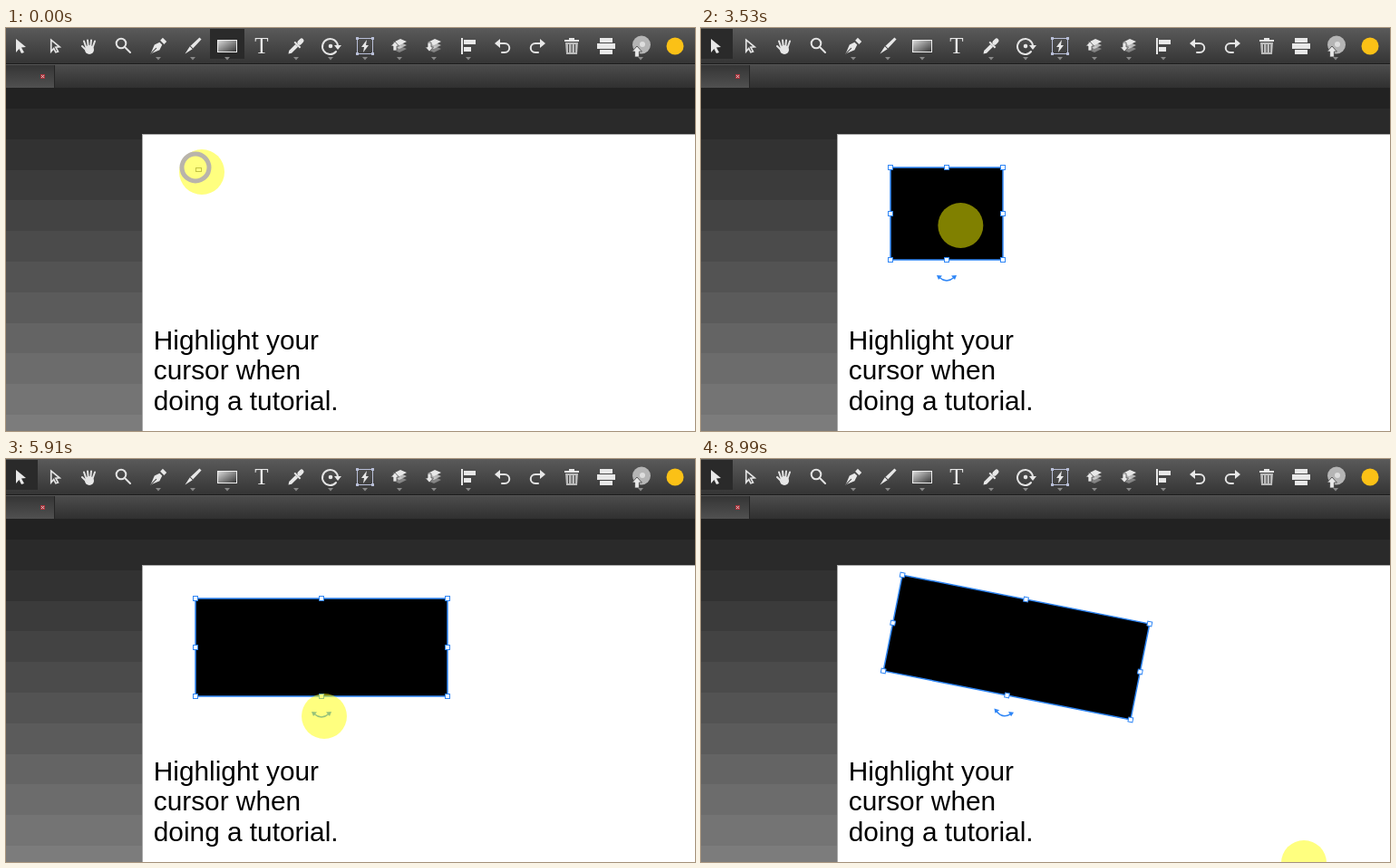
These frames come from a looping animation (760x445 px, 9290 ms). An HTML page:

```html
<!DOCTYPE html>
<html lang="en">
<head>
<meta charset="utf-8">
<title>Cursor highlight</title>
<style>
html, body { margin: 0; width: 100%; height: 100%; overflow: hidden; background: #fff; }
svg { display: block; width: 760px; height: 445px; }
.note { font: 29.8px "Liberation Sans", Arial, sans-serif; }
.glyph { font: 25px "Liberation Serif", Times, serif; text-anchor: middle; }
.line { fill: none; stroke: #e4e4e4; stroke-width: 2; stroke-linecap: round; }
.cut { fill: none; stroke: #444; stroke-width: 1; }
</style>
</head>
<body>
<svg viewBox="0 0 760 445" xmlns="http://www.w3.org/2000/svg">
  <defs>
    <linearGradient id="bar" x2="0" y2="1"><stop stop-color="#5a5a5a"/><stop offset="1" stop-color="#353535"/></linearGradient>
    <linearGradient id="strip" x2="0" y2="1"><stop stop-color="#4c4c4c"/><stop offset="1" stop-color="#303030"/></linearGradient>
    <linearGradient id="tab" x2="0" y2="1"><stop stop-color="#353535"/><stop offset="1" stop-color="#505050"/></linearGradient>
    <linearGradient id="shade" x2="1" y2="1"><stop stop-color="#ddd"/><stop offset="1" stop-color="#333"/></linearGradient>
  </defs>

  <g id="backdrop"></g>
  <rect x="150.5" y="117.5" width="620" height="340" fill="#fff" stroke="#aaa"/>
  <rect width="760" height="39" fill="url(#bar)"/>
  <rect y="39" width="760" height="1" fill="#1c1c1c"/>
  <rect y="40" width="760" height="1" fill="#555"/>
  <rect y="41" width="760" height="25" fill="url(#strip)"/>
  <rect y="41" width="53" height="25" fill="url(#tab)"/>
  <path d="M53.5 41V66" stroke="#252525"/>
  <rect x="38" y="51" width="5" height="5" fill="#a8323a"/>
  <path d="M39 52l3 3m0-3l-3 3" stroke="#ddd" stroke-width=".8"/>
  <rect id="tool" y="1" width="38" height="33" fill="#2a2a2a"/>
  <g id="icons" fill="#e8e8e8"></g>

  <g class="note">
    <text x="162.8" y="355">Highlight your</text>
    <text x="162.8" y="388">cursor when</text>
    <text x="162.8" y="422">doing a tutorial.</text>
  </g>
  <g id="drawing"></g>
  <g id="pointer"></g>
</svg>
<script>
const LOOP = 9290, STEPS = 63, STEP = LOOP / STEPS;
const BLUE = '#2f86f6', LEFT = 209, TOP = 154, PITCH = 38;
const PIVOT = { x: 348, y: 208 };
const el = id => document.getElementById(id);
const repeat = (count, draw) => Array.from({ length: count }, (_, i) => draw(i)).join('');

const path = (d, attrs = '') => `<path d="${d}" ${attrs}/>`;
const box = (x, y, w, h, attrs = '') =>
  `<rect x="${x}" y="${y}" width="${w}" height="${h}" ${attrs}/>`;
const disc = (x, y, r, attrs = '') => `<circle cx="${x}" cy="${y}" r="${r}" ${attrs}/>`;
const group = (transform, body) => `<g transform="${transform}">${body}</g>`;

// Toolbar icons, each drawn around its own centre
const LINE = 'class="line"', CUT = 'class="cut"';
const ARROW = 'M-5-8 6 1 1 1.500 4 7 1 8-1.500 3-5 7z';
const arrowUp = path('M0-5l4.500 5h-2.500v5h-4v-5h-2.500z', 'stroke="#444" stroke-width=".7"');
const layers = repeat(3, i =>
  path(`M-7 ${4 * i - 4}l8-4 7 3-8 4z`, `opacity="${1 - i * 0.3}"`));
const undo = path('M-5-3h7c7 0 7 10 0 10h-3', LINE) + path('M-9-3l6-5v10z');
const icons = [
  path(ARROW),
  group('scale(.85)', path(ARROW, LINE)),
  disc(0, 4, 5) + repeat(4, i =>
    path(`M${i * 2 - 3} 3L${i * 4 - 6} ${-7 + Math.abs(i - 1.5)}`, LINE)) + path('M-3 5l-5-5', LINE),
  disc(-3, -3, 5.3, LINE) + path('M1 1l6 6', LINE),
  group('rotate(45)', path('M0 12l-4-10 2-6h4l2 6z') + box(-3, -10, 6, 4) + path('M0 11V3', CUT)),
  group('rotate(45)', path('M0 12l-2-9 .5-15h3l.5 15z') + path('M-2 2h4', CUT)),
  box(-10.5, -6.5, 21, 13, 'fill="url(#shade)" stroke="#eee"'),
  '<text class="glyph" y="8">T</text>',
  group('rotate(45)', path('M0 12l-2-3v-10h4v10z') + box(-4.5, -3, 9, 2) + box(-2.5, -11, 5, 8, 'rx="2.500"')),
  path('M6 6a8.500 8.500 0 1 1 2-6', LINE) + path('M4-1h8l-4 5z') + disc(0, 0, 2.3),
  box(-8.5, -8.5, 17, 17, 'fill="none" stroke="#b9bfd8"') + repeat(4, i =>
    box(i % 2 ? 7 : -10, i < 2 ? -10 : 7, 3, 3, 'fill="#b9bfd8"')) + path('M2-7l-6 8h3l-1 6 6-8h-3z'),
  layers + group('translate(-5 0)', arrowUp),
  layers + group('translate(-5 1) scale(1 -1)', arrowUp),
  box(-8, -9, 2, 18) + box(-5, -7, 13, 5) + box(-5, 1, 8, 5),
  undo,
  group('scale(-1 1)', undo),
  box(-8, -7, 16, 2) + box(-3, -9, 6, 2) + path('M-7-4h14l-1 13h-12z', 'fill="#bbb"') +
    repeat(3, i => path(`M${i * 3.5 - 3.5}-2v9`, CUT)),
  box(-7, -9, 14, 5) + box(-10, -3, 20, 6) + box(-7, 4, 14, 5),
  disc(1, -1.5, 10, 'fill="#b5b5b5"') + disc(2, -2, 3, 'fill="#ddd"') +
    group('translate(-4 6) scale(1.2)', arrowUp),
  disc(0, 0, 9.5, 'fill="#fbc116"')
];
const hasMenu = i => i > 3 && i < 14 && i !== 7 || i === 18;

// Cursor rests: arrival step, leaving step, x, y
const rests = [
  [-2, -2, 209, 154], [0, 0, 216, 159], [5, 8, 333, 256], [10, 10, 350, 264],
  [16, 17, 41, -4], [19, 21, 17, 18], [25, 25, 355, 269], [28, 30, 333, 256],
  [32, 32, 400, 264], [35, 37, 487, 262], [40, 42, 351, 284], [48, 50, 311, 275],
  [53, 54, 337, 278], [58, 58, 591, 385], [61, 62, 665, 446]
];
const clickSteps = [-2, 5, 19, 28, 37, 42, 54];

const ease = k => (k + k * k * (3 - 2 * k)) / 2;

function cursorAt(n) {
  const i = rests.findIndex(([, leave]) => leave >= n);
  const [arrive, , x, y] = rests[i];
  if (n >= arrive) return { x, y };
  const [, left, fromX, fromY] = rests[i - 1];
  const k = ease((n - left) / (arrive - left));
  return { x: fromX + (x - fromX) * k, y: fromY + (y - fromY) * k };
}

function turnAt(n) {
  const angle = p => Math.atan2(PIVOT.x - p.x, p.y - PIVOT.y) * 180 / Math.PI;
  return angle(cursorAt(n)) - angle(cursorAt(42));
}

const fill = (r, b) => box(LEFT, TOP, r - LEFT, b - TOP);
const outline = (r, b, width = 1.5) =>
  box(LEFT, TOP, r - LEFT, b - TOP, `fill="none" stroke="${BLUE}" stroke-width="${width}"`);
const rotated = (deg, body) => group(`rotate(${deg} ${PIVOT.x} ${PIVOT.y})`, body);

function handles(r, b, open) {
  const size = open ? 5 : 4;
  const look = open ? `fill="#fff" stroke="${BLUE}"` : `fill="${BLUE}"`;
  return repeat(9, i => i === 4 ? '' : box(
    LEFT + (r - LEFT) * (i % 3) / 2 - size / 2,
    TOP + (b - TOP) * Math.floor(i / 3) / 2 - size / 2, size, size, look));
}

const turnIcon = (r, b) => group(`translate(${(LEFT + r) / 2} ${b + 20.5})`,
  path('M-8-1Q0 6 8-1', `fill="none" stroke="${BLUE}" stroke-width="1.5"`) +
  path('M-11-3.500l6 .5-4 4.500zM11-3.500l-6 .5 4 4.500z', `fill="${BLUE}"`));

const selected = (r, b, open) =>
  fill(r, b) + outline(r, b) + handles(r, b, open) + (open ? turnIcon(r, b) : '');

function drawing(n, c) {
  if (n < 1) return '';
  if (n < 5) return outline(c.x, c.y);
  if (n < 30) return selected(333, 256, n >= 20);
  if (n < 37) return fill(333, 256) + outline(c.x, c.y) + turnIcon(c.x, c.y);
  if (n < 43) return selected(487, 262, true);
  if (n < 54) return fill(487, 262) + rotated(turnAt(n), outline(487, 262, 1));
  return rotated(turnAt(53), selected(487, 262, true));
}

function ring(n, start) {
  const age = n - start;
  if (age < 0 || age > 2) return '';
  const { x, y } = cursorAt(start);
  const color = `color-mix(in srgb, #8a829e, #b9b4ab ${Math.max(0, age - 1) * 100}%)`;
  return disc(x, y, 9 + 3 * age, `fill="none" style="stroke:${color}" stroke-width="${3 + age}"`);
}

const pointer = (n, c) =>
  (n < 1 ? box(209.5, 154.5, 6, 4, 'fill="none" stroke="#888"') : '') +
  disc(c.x, c.y, 25, 'fill="#ff0" fill-opacity=".5"') +
  clickSteps.map(start => ring(n, start)).join('');

function buildStage() {
  el('backdrop').innerHTML = repeat(12, i => {
    const y = i ? Math.round(55.2 + i * 33.8) : 66, g = Math.round(34 + i * 8.2);
    return box(0, y, 760, 445 - y, `fill="rgb(${g},${g},${g})"`);
  });
  el('icons').innerHTML = icons.map((icon, i) => group(`translate(${16 + i * PITCH} 20)`,
    icon + (hasMenu(i) ? path('M-3 12h6l-3 3.500z', 'fill="#888"') : ''))).join('');
}

let shown = -1;
function render(now) {
  // The small lead keeps the even grid aligned with the rounded frame times.
  const n = Math.floor((now % LOOP + 10) / STEP) % STEPS;
  if (n === shown) return;
  shown = n;
  const c = cursorAt(n);
  el('tool').setAttribute('x', (n < 20 ? 6 : 0) * PITCH - 3);
  el('drawing').innerHTML = drawing(n, c);
  el('pointer').innerHTML = pointer(n, c);
}

buildStage();
const began = performance.now();
function tick() {
  render(performance.now() - began);
  requestAnimationFrame(tick);
}
tick();
</script>
</body>
</html>
```
